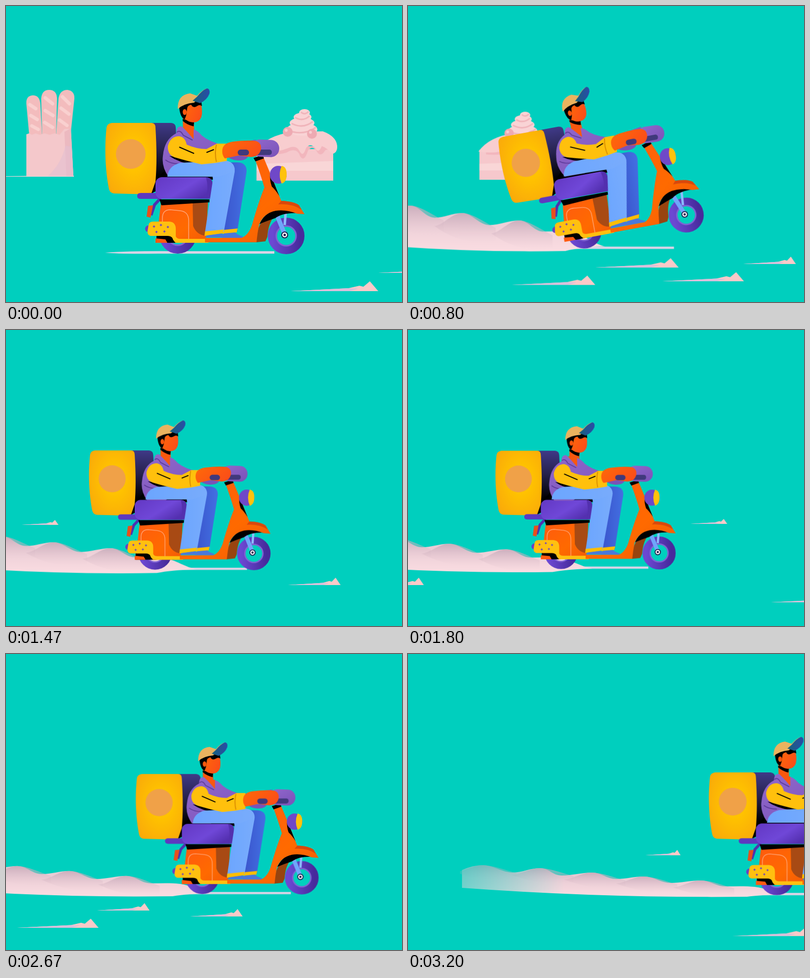
Write an HTML page without scripts that moves like this. It is 800 px wide and 600 px high and loops after 3270 ms.

```html
<!DOCTYPE html>
<html lang="en">
<head>
<meta charset="utf-8">
<title>Scooter delivery</title>
<style>
html, body { margin: 0; width: 100%; height: 100%; overflow: hidden; background: #00cfbe; }
svg { display: block; width: 100vw; height: 100vh; }
.shop, .rocks, .shadow, .dust, .puff, .bike, .fork, .sway, .nod, .thigh {
  animation: 3270ms linear infinite;
}
.shop { animation-name: shop; }
.rocks { animation-name: rocks; }
.shadow { animation-name: shadow; }
.dust { animation-name: dust; }
.puff { animation-name: puff; }
.bike { animation-name: bike; }
.fork { animation-name: fork; }
.sway { animation-name: sway; }
.nod { animation-name: nod; }
.thigh { animation-name: thigh; }

/* camera pulls back, then the street rushes by */
@keyframes shop {
  0% { transform: translate(0, 0) scale(1); }
  14.37% { transform: translate(32px, 9px) scale(.972); animation-timing-function: cubic-bezier(.33, 0, .67, .33); }
  23% { transform: translate(-241px, 14px) scale(.955); }
  34.5%, 100% { transform: translate(-982px, 24px) scale(.93); }
}
@keyframes rocks {
  0% { transform: translateX(0); }
  14.37% { transform: translateX(0); animation-timing-function: cubic-bezier(.33, 0, .67, .33); }
  23% { transform: translateX(-273px); }
  100% { transform: translateX(-5187px); }
}
/* placed by the rear axle */
@keyframes bike {
  0% { transform: translate(347px, 466px) rotate(0deg) scale(1) translate(-347px, -466px); animation-timing-function: ease-in-out; }
  14.37% { transform: translate(376px, 462px) rotate(-31deg) scale(.98) translate(-347px, -466px); }
  18.4% { transform: translate(376px, 459px) rotate(-28deg) scale(.97) translate(-347px, -466px); animation-timing-function: ease-in; }
  26.5% { transform: translate(344px, 456px) rotate(0deg) scale(.945) translate(-347px, -466px); }
  34.56% { transform: translate(307px, 455px) rotate(0deg) scale(.93) translate(-347px, -466px); }
  45% { transform: translate(301px, 453px) rotate(0deg) scale(.912) translate(-347px, -466px); }
  55.05% { transform: translate(309px, 452px) rotate(0deg) scale(.905) translate(-347px, -466px); }
  67.28% { transform: translate(331px, 452px) rotate(0deg) scale(.908) translate(-347px, -466px); }
  75% { transform: translate(355px, 452.5px) rotate(0deg) scale(.912) translate(-347px, -466px); }
  81.65% { transform: translate(396px, 453.5px) rotate(0deg) scale(.918) translate(-347px, -466px); }
  89.76% { transform: translate(516px, 454px) rotate(0deg) scale(.928) translate(-347px, -466px); }
  97.86% { transform: translate(744px, 455px) rotate(0deg) scale(.938) translate(-347px, -466px); }
  100% { transform: translate(818px, 455px) rotate(0deg) scale(.94) translate(-347px, -466px); }
}
@keyframes fork {
  0%, 26.5%, 100% { transform: translate(0, 0); }
  14.37%, 18.4% { transform: translate(-1px, 20px); }
}
@keyframes sway {
  0% { transform: translate(0, 0); }
  14.37% { transform: translate(-3px, -22px); }
  26.5% { transform: translate(1px, 2px); }
  34.56% { transform: translate(-2px, 0); }
  55.05% { transform: translate(4px, 3px); }
  67.28% { transform: translate(0, -3px); }
  81.65% { transform: translate(-4px, 0); }
  97.86%, 100% { transform: translate(-3px, -4px); }
}
@keyframes nod {
  0% { transform: translate(368px, 252px) rotate(0deg) translate(-368px, -252px); }
  14.37% { transform: translate(365px, 249px) rotate(-21deg) translate(-368px, -252px); }
  26.5% { transform: translate(371px, 253px) rotate(3deg) translate(-368px, -252px); }
  34.56% { transform: translate(365px, 252px) rotate(0deg) translate(-368px, -252px); }
  55.05% { transform: translate(372px, 254px) rotate(2deg) translate(-368px, -252px); }
  67.28% { transform: translate(369px, 249px) rotate(0deg) translate(-368px, -252px); }
  81.65% { transform: translate(363px, 252px) rotate(0deg) translate(-368px, -252px); }
  97.86%, 100% { transform: translate(364px, 249px) rotate(0deg) translate(-368px, -252px); }
}
@keyframes thigh {
  0%, 26.5%, 100% { transform: translate(448px, 335px) rotate(0deg) translate(-448px, -335px); }
  14.37% { transform: translate(448px, 335px) rotate(8deg) translate(-448px, -335px); }
}
@keyframes shadow {
  0% { transform: translate(347px, 500px) scale(1); }
  14.37% { transform: translate(376px, 494px) scale(1.08, 1); }
  34.56% { transform: translate(307px, 487px) scale(.93); }
  55.05% { transform: translate(309px, 482px) scale(.905); }
  67.28% { transform: translate(331px, 482px) scale(.908); }
  81.65% { transform: translate(396px, 485px) scale(.918); }
  89.76% { transform: translate(516px, 486px) scale(.928); }
  97.86% { transform: translate(744px, 487px) scale(.938); }
  100% { transform: translate(818px, 487px) scale(.94); }
}
@keyframes dust {
  0% { transform: translate(350px, 500px) scale(0, 0); }
  5% { transform: translate(358px, 497px) scale(.2, .9); }
  14.37% { transform: translate(378px, 490px) scale(1, 2.1); }
  34.56% { transform: translate(378px, 488px) scale(1, 1.65); }
  55.05% { transform: translate(352px, 485px) scale(1, 1.4); }
  67.28% { transform: translate(366px, 485px) scale(1, 1.25); }
  81.65% { transform: translate(396px, 486px) scale(1, 1.25); }
  89.76% { transform: translate(516px, 487px) scale(1, 1.12); }
  97.86% { transform: translate(744px, 488px) scale(1, 1); }
  100% { transform: translate(818px, 488px) scale(1, 1); }
}
@keyframes puff {
  0%, 26% { transform: translate(540px, 500px) scale(0); }
  30% { transform: translate(490px, 500px) scale(.8); }
  34.56% { transform: translate(390px, 500px) scale(1); }
  42%, 100% { transform: translate(180px, 500px) scale(0); }
}
</style>
</head>
<body>
<svg viewBox="0 0 800 600" preserveAspectRatio="none">
<defs>
  <radialGradient id="boxFill" cx=".55" cy=".45" r=".75">
    <stop offset=".3" stop-color="#ffc200"/><stop offset="1" stop-color="#f9a50c"/>
  </radialGradient>
  <linearGradient id="boxSide" x2="0" y2="1">
    <stop offset="0" stop-color="#403a88"/><stop offset=".35" stop-color="#27234f"/><stop offset=".75" stop-color="#000"/>
  </linearGradient>
  <linearGradient id="tyre">
    <stop offset="0" stop-color="#6c48d2"/><stop offset="1" stop-color="#472a9c"/>
  </linearGradient>
  <linearGradient id="seatFill" x2="1" y2=".6">
    <stop offset="0" stop-color="#6338c4"/><stop offset=".6" stop-color="#7048d8"/><stop offset="1" stop-color="#5430b0"/>
  </linearGradient>
  <linearGradient id="body" x2="1" y2="1">
    <stop offset="0" stop-color="#ff5a10"/><stop offset=".6" stop-color="#ff6a00"/><stop offset="1" stop-color="#f25a08"/>
  </linearGradient>
  <linearGradient id="jean"><stop offset="0" stop-color="#6ca6ff"/><stop offset="1" stop-color="#79acfc"/></linearGradient>
  <linearGradient id="jeanFar"><stop offset="0" stop-color="#3a54cc"/><stop offset="1" stop-color="#4370e2"/></linearGradient>
  <linearGradient id="vest" x2="1" y2="1"><stop offset="0" stop-color="#9168cc"/><stop offset="1" stop-color="#7a52b8"/></linearGradient>
  <linearGradient id="skin" x2="1" y2=".5"><stop offset="0" stop-color="#ff6a08"/><stop offset="1" stop-color="#fb4f18"/></linearGradient>
  <linearGradient id="brim" x2="1"><stop offset="0" stop-color="#16627c"/><stop offset="1" stop-color="#2a4ca8"/></linearGradient>
  <linearGradient id="haze" x2="0" y2="1">
    <stop offset="0" stop-color="#dcc0cc"/><stop offset=".55" stop-color="#edd0d8"/><stop offset="1" stop-color="#fbdde2"/>
  </linearGradient>
  <linearGradient id="crest" x2="0" y2="1">
    <stop offset="0" stop-color="#c3a6b6" stop-opacity=".75"/><stop offset="1" stop-color="#e8c8d2" stop-opacity="0"/>
  </linearGradient>
  <linearGradient id="fade" gradientUnits="userSpaceOnUse" x1="-636" x2="-430">
    <stop offset="0" stop-color="#777"/><stop offset="1" stop-color="#fff"/>
  </linearGradient>
  <mask id="tail" maskUnits="userSpaceOnUse" x="-640" y="-100" width="700" height="140">
    <rect x="-640" y="-100" width="700" height="140" fill="url(#fade)"/>
  </mask>
  <g id="rock">
    <path fill="#fac9c8" d="M-177 0L-60-6L-38-11L-30-9L-17-20L0 0Z"/>
    <path fill="#d9c0dc" d="M-177 0L-60-6L-40-5L-58 0Z"/>
  </g>
  <path id="hump" fill="url(#crest)" d="M-56 0C-40 0-20-14 0-14S45-4 68 2V16Q0 22-56 0Z"/>
  <path id="star" fill="#6a3fc4" d="M0-3L1-1L3 0L1 1L0 3L-1 1L-3 0L-1-1Z"/>
  <g id="wheel">
    <circle r="28" fill="none" stroke="url(#tyre)" stroke-width="18"/>
    <circle r="20" fill="none" stroke="#8063d4" stroke-width="3"/>
  </g>
</defs>

<rect width="800" height="600" fill="#00cfbe"/>

<g class="shop">
  <path fill="#f3d5da" d="M0 345L90 344H137V346H0Z"/>
  <!-- bread bag -->
  <g fill="#f3bcbd">
    <path d="M47 264L41 198Q40 182 54 181Q67 181 69 196L73 264Z"/>
    <path d="M73 264L71 188Q72 170 87 170Q102 170 103 187L101 264Z"/>
    <path d="M101 264L106 187Q109 170 124 170Q139 172 138 188L130 264Z"/>
  </g>
  <g stroke="#f9d0cf" stroke-width="7" stroke-linecap="round">
    <path d="M48 200L60 208M50 222L63 230M52 243L65 250M79 186L94 198M79 212L95 222M78 236L94 246M114 184L128 198M111 207L127 219M108 231L123 242"/>
  </g>
  <path fill="#f4c8cb" d="M41 260L47 258L52 261L60 258L68 261L78 258L88 261L98 258L108 261L118 249H131L136 345H41Z"/>
  <path fill="#ecb9c0" d="M118 255L131 248L136 345H122Z"/>
  <path fill="#e5c0d2" opacity=".6" d="M120 283Q112 320 84 345H136L133 285Z"/>
  <!-- cake -->
  <path fill="#f6c8cc" d="M506 290H661V354H506Z"/>
  <path fill="#f9d6d7" d="M506 320L661 314V334H506Z"/>
  <path fill="#f2b6bd" d="M520 284H661V300Q655 288 645 292Q635 309 627 293Q618 282 610 293Q602 318 594 304Q589 288 572 294Q560 303 520 300Z"/>
  <path fill="#f8cdcf" d="M504 294Q526 262 580 255L640 254Q667 264 669 283Q670 298 658 300Q648 287 638 284Q631 301 624 287Q614 277 606 288Q600 308 593 294Q586 281 570 288Q540 300 504 294Z"/>
  <g fill="#f9d3d5">
    <ellipse cx="598" cy="250" rx="31" ry="13"/><ellipse cx="598" cy="237" rx="25" ry="11"/>
    <ellipse cx="599" cy="225" rx="18" ry="9"/><ellipse cx="603" cy="216" rx="11" ry="7"/>
  </g>
  <path fill="none" stroke="#f0b4ba" stroke-width="3" d="M570 252Q600 264 626 246M577 238Q600 250 620 234M584 226Q600 235 613 223M596 215Q603 222 611 214"/>
  <g fill="#eeaab2"><circle cx="569" cy="255" r="10"/><circle cx="618" cy="259" r="10"/></g>
  <g fill="#f8cdd1"><circle cx="566" cy="252" r="3"/><circle cx="615" cy="256" r="3"/></g>
  <use href="#rock" x="752" y="578"/>
  <use href="#rock" x="929" y="541"/>
</g>

<g class="shadow">
  <path fill="#d9d3e6" d="M-147 0Q-90-4 0-3H195V2H-40Q-120 3-147 0Z"/>
</g>

<g class="dust">
  <g mask="url(#tail)">
    <path fill="url(#haze)" d="M-636-50Q-615-60-594-60C-574-60-554-45-534-45S-499-54-479-54S-454-39-434-39S-394-45-374-45S-344-32-324-32S-289-37-269-37S-234-24-214-24S-174-29-154-29S-124-17-104-17S-64-18-44-16S0-3 20-1Q-30 0-60 4Q-350 7-636-14Z"/>
    <use href="#hump" x="-594" y="-46"/><use href="#hump" x="-479" y="-40"/>
    <use href="#hump" x="-374" y="-31"/><use href="#hump" x="-269" y="-23"/>
    <use href="#hump" x="-154" y="-15"/>
  </g>
</g>
<g class="puff">
  <path fill="#f6dde2" d="M-100 0Q-85-6-70-12Q-50-14-35-5Q0-3 20-7Q40-14 60-10L98 0Z"/>
</g>

<g class="rocks">
  <use href="#rock" transform="translate(1047 558) scale(.93)"/>
  <use href="#rock" transform="translate(1152 523) scale(.6 .75)"/>
  <use href="#rock" transform="translate(1782 395) scale(.42 .5)"/>
  <use href="#rock" transform="translate(2352 517) scale(.6 .75)"/>
  <use href="#rock" transform="translate(2965 393) scale(.42 .5)"/>
  <use href="#rock" transform="translate(3218 552) scale(.93)"/>
  <use href="#rock" transform="translate(3318 518) scale(.6 .75)"/>
  <use href="#rock" transform="translate(3933 393) scale(.42 .5)"/>
  <use href="#rock" transform="translate(4205 555) scale(.93)"/>
  <use href="#rock" transform="translate(4308 520) scale(.6 .75)"/>
  <use href="#rock" transform="translate(4496 532) scale(.6 .75)"/>
  <use href="#rock" transform="translate(5603 408) scale(.4 .55)"/>
  <use href="#rock" transform="translate(5872 572) scale(.93)"/>
</g>

<g class="bike">
  <use href="#wheel" x="347" y="465"/>
  <!-- delivery box -->
  <path fill="url(#boxSide)" d="M290 237H334Q343 238 343 247L348 352L292 381Z"/>
  <path fill="url(#boxFill)" d="M214 237H294Q302 237 302 247Q306 310 302 356L293 382L218 380Q210 379 208 371C200 330 199 285 203 247Q204 238 214 237Z"/>
  <circle cx="252" cy="300" r="30" fill="#f0a148"/>

  <!-- far leg -->
  <path fill="url(#jeanFar)" d="M440 317H468Q487 318 486 336L467 458L436 456Z"/>
  <path fill="#ffbe00" d="M438 454L468 451L466 459L438 462Z"/>
  <path fill="#4a78da" d="M440 461L463 459Q468 464 478 467V470H436Z"/>

  <!-- rear body -->
  <path fill="none" stroke="#4f30b0" stroke-width="6" d="M312 390L300 403L293 424"/>
  <path fill="#e8501c" d="M287 405L297 404L292 429L284 427Z"/>
  <path fill="#000" d="M304 462L345 462L350 480H304Z"/>
  <path fill="url(#body)" d="M313 400L408 397L404 480H342L338 466H306Q309 430 313 400Z"/>
  <path fill="#a84a14" d="M377 400L408 397L404 466Q385 464 378 446Z"/>
  <path fill="#000" d="M310 392H411V398L314 404Z"/>
  <path fill="none" stroke="#ffa476" stroke-width="1.5" d="M316 440V430Q316 413 332 413L352 415Q369 417 369 435V474"/>
  <path fill="#ff5a10" d="M302 471L322 473L326 480H302Z"/>
  <path fill="#6a3fc4" d="M290 444Q281 445 281 452Q282 458 288 458Z"/>
  <path fill="#ffc010" d="M288 444Q289 437 297 437H330Q343 438 343 452V467Q345 472 352 472H402Q410 474 409 480H347Q339 480 336 470Q333 466 326 466H292Q285 464 286 456Z"/>
  <g><use href="#star" x="299" y="447"/><use href="#star" x="313" y="444"/><use href="#star" x="327" y="448"/><use href="#star" x="304" y="458"/><use href="#star" x="320" y="457"/></g>
  <path fill="#5e38c0" d="M272 379H415V391H272Q265 391 265 385Q265 379 272 379Z"/>
  <path fill="#000" d="M306 350L330 322L425 336V352Z"/>
  <rect x="302" y="347" width="115" height="44" rx="13" fill="url(#seatFill)"/>
  <path fill="#5330ae" d="M404 347Q417 348 417 360V378Q417 390 404 391Q410 368 404 347Z"/>

  <!-- front wheel and fork -->
  <g class="fork">
    <use href="#wheel" x="566" y="466"/>
    <path stroke="#6fa6fa" stroke-width="9" d="M536 396L562 460"/>
    <path stroke="#8dbcff" stroke-width="5" d="M566 406L563 444"/>
    <circle cx="563" cy="464" r="6" fill="#fff" stroke="#1d1a4c" stroke-width="2"/>
    <circle cx="563" cy="464" r="2.5" fill="#1d1a4c"/>
  </g>

  <!-- leg shield -->
  <path fill="#98440f" d="M505 479Q506 446 524 428L542 426Q530 440 528 468L524 477Z"/>
  <path fill="#000" d="M512 442Q526 412 560 410L592 420Q560 418 544 430Q526 436 512 442Z"/>
  <path fill="url(#body)" d="M402 470H476Q490 464 497 444C506 412 515 385 522 368Q514 340 502 308L519 304Q530 330 539 352L556 395Q582 396 592 404L603 422L588 421Q566 412 545 415Q520 420 511 444Q508 460 506 479H402Z"/>
  <path fill="#d9480c" d="M556 395Q582 396 592 404L597 413Q578 400 550 402Z"/>
  <path fill="#000" d="M534 340L552 385Q544 372 537 366Q532 352 534 340ZM500 308L519 302L521 309L504 315Z"/>
  <ellipse cx="550" cy="342" rx="17" ry="18" fill="#6f48c8"/>
  <path fill="#ffc20c" d="M557 324Q567 326 567 341Q567 357 557 360Q549 342 557 324Z"/>

  <!-- rider -->
  <g class="sway">
    <g class="nod">
      <path fill="#f9580e" d="M357 218H379L381 270H358Z"/>
      <path fill="#000" d="M357 229L380 235L379 244Q366 241 357 233Z"/>
      <path fill="url(#skin)" d="M358 194H393Q398 212 395 224Q391 236 378 236Q363 235 358 222Z"/>
      <path fill="#000" d="M350 206L366 190L394 190L396 203Q391 199 386 203Q378 208 374 200Q366 202 366 208L364 222L361 230Q352 226 350 206Z"/>
      <ellipse cx="361" cy="215" rx="4" ry="6" fill="#f9580e"/>
      <path fill="#eab35f" d="M347 209Q346 180 372 177L386 182Q396 170 406 167L404 174L380 196Q358 198 347 209Z"/>
      <path fill="url(#brim)" d="M386 184Q396 171 406 167Q413 168 411 178Q406 191 392 197L377 192Z"/>
    </g>
    <path fill="url(#vest)" d="M344 258Q344 243 355 244L378 266V250Q387 252 396 263Q412 276 440 282L505 271V295L440 306L400 318L370 346H328Q314 325 317 304Q320 270 344 258Z"/>
    <path fill="none" stroke="#5d3c9a" stroke-width="2" d="M345 256Q352 250 358 262L377 272M322 312Q332 320 350 320"/>
    <path fill="#f9580e" d="M358 246L379 250V270Z"/>
    <path fill="#000" d="M330 304Q370 310 420 314L415 321L380 322Q350 318 330 304Z"/>
  </g>
  <path fill="url(#jean)" d="M414 318L440 313Q464 316 462 336L440 458L402 459L418 352Z"/>
  <path class="thigh" fill="url(#jean)" d="M326 346Q328 324 352 318L440 313Q462 314 462 334L430 346Z"/>
  <path fill="#ffbe00" d="M402 457L440 453L438 461L401 466Z"/>
  <path fill="#4a78da" d="M406 465L436 461Q440 465 450 467V469H402Z"/>

  <rect x="496" y="271" width="56" height="35" rx="17" fill="url(#vest)" transform="rotate(2 524 288)"/>
  <path fill="#7a52b8" d="M446 303H490Q486 314 468 313Q452 312 446 303Z"/>
  <rect x="484" y="291" width="53" height="11" rx="5" fill="#40397c"/>
  <g class="sway">
    <path fill="#ffc00c" d="M327 284Q332 264 350 264Q362 266 365 281Q385 290 405 290L426 279H446V314L424 318L395 321Q365 314 345 308Q326 304 327 284Z"/>
    <path fill="none" stroke="#000" stroke-width="2" d="M350 286L380 299M405 297L420 291"/>
    <path fill="none" stroke="#d98c00" stroke-width="2" d="M425 281Q421 298 425 316"/>
  </g>
  <path fill="url(#skin)" d="M437 292Q438 278 458 275Q490 271 506 274Q517 278 515 291Q511 306 494 306L470 303L442 309Q436 302 437 292Z"/>
  <rect x="468" y="291" width="23" height="12" rx="6" fill="#40397c"/>
</g>
</svg>
</body>
</html>
```
